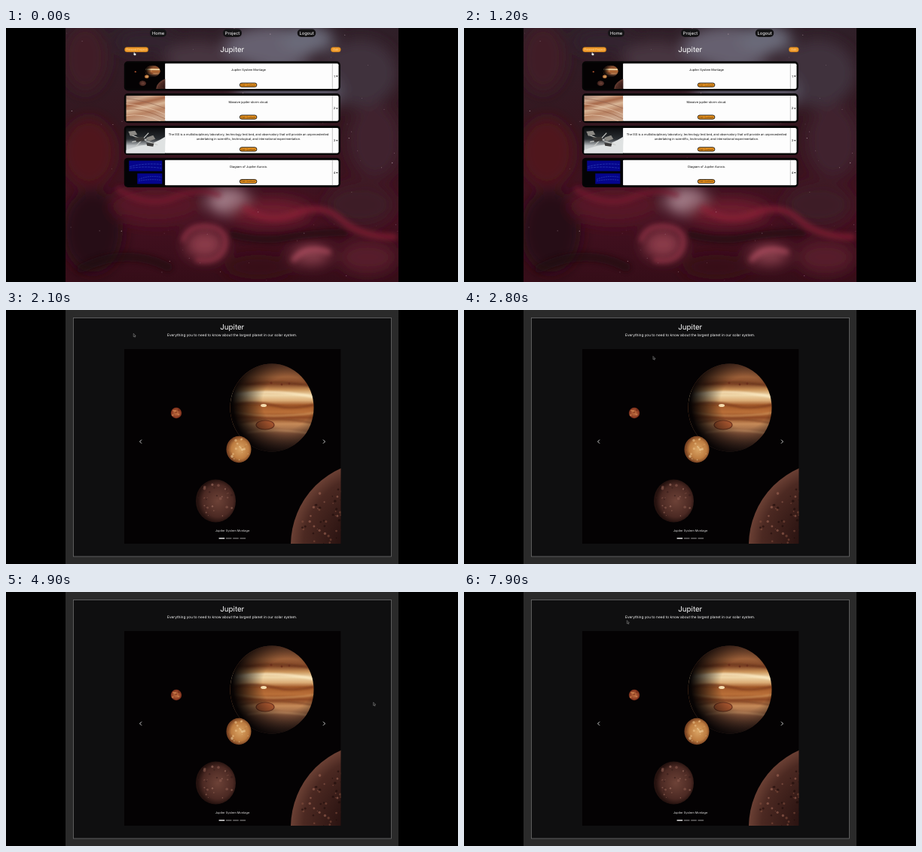
Recreate the animation shown at these times as an HTML page. Size 600 by 338 pixels, loop 8 s.

```html
<!DOCTYPE html>
<html lang="en">
<head>
<meta charset="utf-8">
<title>Jupiter slideshow</title>
<style>
  html, body { margin: 0; width: 100%; height: 100%; overflow: hidden; background: #000; }
  svg { display: block; }
  #stage { width: 100vw; height: 100vh; }
  text { font-family: Inter, Roboto, sans-serif; text-anchor: middle; text-rendering: geometricPrecision; }
</style>
</head>
<body>
<svg id="stage" viewBox="0 0 600 338" xmlns="http://www.w3.org/2000/svg">
  <defs>
    <filter id="soft" x="-30%" y="-30%" width="160%" height="160%"><feGaussianBlur stdDeviation="9"/></filter>
    <filter id="misty" x="-10%" y="-10%" width="120%" height="120%"><feGaussianBlur stdDeviation="3"/></filter>
    <filter id="hazy"><feGaussianBlur stdDeviation="1"/></filter>
    <clipPath id="page"><rect x="79" width="442" height="338"/></clipPath>
    <clipPath id="globe"><ellipse cx="353" cy="130" rx="55.5" ry="58.5"/></clipPath>
    <linearGradient id="sky" x2="0" y2="1">
      <stop offset="0" stop-color="#2f1f28"/>
      <stop offset=".4" stop-color="#35161f"/>
      <stop offset=".75" stop-color="#431020"/>
      <stop offset="1" stop-color="#350d18"/>
    </linearGradient>
    <linearGradient id="bands" x2="0" y2="1">
      <stop offset="0" stop-color="#6b3f2c"/>
      <stop offset=".16" stop-color="#9b5f38"/>
      <stop offset=".24" stop-color="#7e4325"/>
      <stop offset=".3" stop-color="#c99258"/>
      <stop offset=".36" stop-color="#f0d8aa"/>
      <stop offset=".42" stop-color="#dcae78"/>
      <stop offset=".47" stop-color="#a35a2b"/>
      <stop offset=".55" stop-color="#b96f38"/>
      <stop offset=".61" stop-color="#8f4a25"/>
      <stop offset=".68" stop-color="#c58a58"/>
      <stop offset=".8" stop-color="#85543b"/>
      <stop offset="1" stop-color="#3b2620"/>
    </linearGradient>
    <radialGradient id="shade" cx=".68" cy=".44" r=".64">
      <stop offset=".45" stop-color="#000" stop-opacity="0"/>
      <stop offset=".75" stop-color="#030102" stop-opacity=".55"/>
      <stop offset="1" stop-color="#030102" stop-opacity=".98"/>
    </radialGradient>
    <radialGradient id="io"><stop offset="0" stop-color="#c67343"/><stop offset="1" stop-color="#7b2d1a"/></radialGradient>
    <radialGradient id="europa" cx=".55"><stop offset="0" stop-color="#dba565"/><stop offset=".7" stop-color="#bd7c40"/><stop offset="1" stop-color="#7a4322"/></radialGradient>
    <radialGradient id="ganymede" cx=".55"><stop offset="0" stop-color="#6d4237"/><stop offset=".75" stop-color="#4b2923"/><stop offset="1" stop-color="#25120f"/></radialGradient>
    <radialGradient id="callisto"><stop offset=".4" stop-color="#2a1311"/><stop offset=".85" stop-color="#4c2922"/><stop offset="1" stop-color="#6b4034"/></radialGradient>
    <linearGradient id="storm" x2=".35" y2="1">
      <stop offset="0" stop-color="#9d7c70"/><stop offset=".2" stop-color="#cfaa8f"/>
      <stop offset=".38" stop-color="#a8694a"/><stop offset=".55" stop-color="#d9b697"/>
      <stop offset=".75" stop-color="#b98363"/><stop offset="1" stop-color="#c9a389"/>
    </linearGradient>
    <linearGradient id="orbit" x2="0" y2="1">
      <stop offset="0" stop-color="#0b0c0e"/><stop offset=".45" stop-color="#2b2f33"/>
      <stop offset=".7" stop-color="#b9bdbf"/><stop offset="1" stop-color="#e6e8e8"/>
    </linearGradient>

    <symbol id="montage" viewBox="157 52 287.5 259" preserveAspectRatio="none">
      <rect x="157" y="52" width="287.5" height="259" fill="#040203"/>
      <g clip-path="url(#globe)">
        <rect x="297" y="70" width="112" height="120" fill="url(#bands)"/>
        <g fill="none" stroke-width="1.6" opacity=".7" filter="url(#hazy)">
          <path d="M318 99Q360 92 409 102" stroke="#5f2e1b"/>
          <path d="M305 112Q360 105 409 116" stroke="#fff0cb" stroke-width="3"/>
          <path d="M302 126Q330 121 355 127T409 126" stroke="#7c3a1c" stroke-width="3"/>
          <path d="M302 136Q350 145 409 137" stroke="#e3b174"/>
          <path d="M310 150Q360 140 409 151" stroke="#6c331c"/>
          <path d="M320 163Q360 157 400 164" stroke="#e0ad79"/>
        </g>
        <ellipse cx="344" cy="153" rx="12" ry="6" fill="#a7562f" stroke="#6d331e" stroke-width="1.2"/>
        <ellipse cx="342" cy="127" rx="4" ry="2" fill="#f6dcae"/>
        <g fill="#6a2f1b"><circle cx="352" cy="97" r="1.6"/><circle cx="366" cy="99" r="1.4"/><circle cx="376" cy="98" r="1.4"/></g>
        <rect x="296" y="70" width="114" height="120" fill="url(#shade)"/>
      </g>
      <circle cx="226" cy="137" r="7.2" fill="url(#io)"/>
      <ellipse cx="309" cy="185.5" rx="16.5" ry="17.7" fill="url(#europa)"/>
      <ellipse cx="278.5" cy="254" rx="26.5" ry="28.5" fill="url(#ganymede)"/>
      <circle cx="490" cy="313" r="112" fill="url(#callisto)"/>
      <g id="craters"></g>
    </symbol>

    <symbol id="clouds" viewBox="0 0 52 34">
      <rect width="52" height="34" fill="url(#storm)"/>
      <g fill="none" stroke-width="1" opacity=".6">
        <path d="M0 4Q24 6 52 17" stroke="#8d5f4c"/>
        <path d="M0 11Q26 13 52 25" stroke="#efd3b8"/>
        <path d="M0 18Q22 16 52 31" stroke="#93583e"/>
        <path d="M0 27Q22 23 46 34" stroke="#f0d6bd"/>
      </g>
    </symbol>

    <symbol id="station" viewBox="0 0 52 34">
      <rect width="52" height="34" fill="url(#orbit)"/>
      <path d="M0 30Q14 24 25 23T52 12V34H0Z" fill="#dfe2e2"/>
      <path d="M5 9L42 23M13 25L30 7M8 19L34 14" stroke="#c9cac6" stroke-width="1.2"/>
      <path d="M3 5L12 4L15 9L6 11ZM27 13L36 10L39 15L30 18Z" fill="#8b8984"/>
      <path d="M11 13L23 12L25 17L14 19ZM27 20L37 21L36 25L28 24Z" fill="#3a3938"/>
    </symbol>

    <symbol id="aurora" viewBox="0 0 52 34">
      <rect width="52" height="34" fill="#030306"/>
      <path d="M4 1H48V15H4ZM15 18H48V32H15Z" fill="#05058c"/>
      <g fill="none" stroke="#3f5cc8" stroke-width=".5">
        <path d="M5 9Q24 4 47 6M5 11Q25 8 47 11" stroke-dasharray="3 1"/>
        <path d="M17 26Q30 20 47 23M17 28Q32 25 47 27" stroke-dasharray="2 1"/>
      </g>
    </symbol>
  </defs>

  <rect width="600" height="338"/>

  <g id="editor" clip-path="url(#page)">
    <rect x="79" width="442" height="338" fill="url(#sky)"/>
    <g id="glow" filter="url(#soft)"></g>
    <g fill="none" stroke-linecap="round" filter="url(#misty)" opacity=".6">
      <path d="M235 282Q242 262 268 264T291 290Q284 314 254 309" stroke="#a53b50" stroke-width="6"/>
      <path d="M318 240Q350 262 385 247T445 255T515 278" stroke="#8f2338" stroke-width="9"/>
      <path d="M382 308Q398 288 428 298" stroke="#bb5366" stroke-width="7"/>
      <path d="M150 215Q190 240 222 226T282 222" stroke="#7d1d31" stroke-width="8"/>
      <path d="M300 275Q340 285 372 279T450 272" stroke="#1c0911" stroke-width="10"/>
      <path d="M100 320Q160 290 215 318" stroke="#1c0911" stroke-width="12"/>
    </g>
    <g id="stars" fill="#d6bcc6"></g>
    <g id="nav" fill="#fff" font-size="5.8"></g>
    <text x="300.3" y="31.5" font-size="9.7" fill="#fff">Jupiter</text>
    <rect id="focus" x="156.5" y="24.7" width="33.300" height="8.200" rx="2" fill="#1a1518" stroke="#b9c3dd" stroke-width=".7"/>
    <g fill="#ef9a2c" stroke="#a9670f" stroke-width=".4">
      <rect x="157.500" y="25.600" width="31.300" height="6.400" rx="3"/>
      <rect x="431.300" y="25.600" width="13" height="6.400" rx="3"/>
    </g>
    <g font-size="3.8" fill="#ffd592">
      <text x="173.2" y="30.200">Present Project</text>
      <text x="437.8" y="30.200">Edit</text>
    </g>
    <g id="cards"></g>
    <path d="M169.600 32.300q.7-.7 1 .2l.2 1.100 1.500.4q.5.200.3 1l-.4 1.500h-2l-1.400-1.800q0-.7.900-.3Z" fill="#fff" stroke="#222" stroke-width=".35"/>
  </g>

  <g id="show">
    <rect x="79" width="442" height="338" fill="#2a2a2a"/>
    <rect x="89.5" y="10.5" width="422" height="317.5" fill="#0f0f10" stroke="#6d6d6d" stroke-width=".8"/>
    <g fill="#fff">
      <text x="300.3" y="26.200" font-size="9.7">Jupiter</text>
      <text x="300.2" y="35.400" font-size="4.8">Everything you to need to know about the largest planet in our solar system.</text>
    </g>
    <use href="#montage" x="157" y="52" width="287.5" height="259"/>
    <path d="M180 172.600l-2.500 2.500 2.500 2.500M421 172.600l2.500 2.500-2.500 2.500" fill="none" stroke="#c9c9c9" stroke-width="1"/>
    <text x="300.5" y="295" font-size="3.95" fill="#e4e4e4">Jupiter System Montage</text>
    <g id="dots" fill="#fff"></g>
    <path id="arrow" d="M0 0V4.300L1 3.400L1.700 4.900L2.400 4.600L1.800 3.100H3.100Z" fill="#111" stroke="#bbb" stroke-width=".4"/>
  </g>
</svg>

<script>
const LOOP = 8000, PRESS = 2000, OPEN = 2100, STEP = 100;
const $ = id => document.getElementById(id);

let seed = 11;
const rand = (a, b) => {
  seed = (seed * 16807) % 2147483647;
  return a + (b - a) * seed / 2147483647;
};
const pick = list => list[Math.floor(rand(0, list.length))];
const repeat = (n, make) => Array.from({ length: n }, (_, i) => make(i)).join('');

// Background clouds: x, y, rx, ry, colour
const clouds = [
  [105, 40, 30, 45, '#3f1a26'], [185, 18, 40, 18, '#33232e'],
  [255, 40, 45, 22, '#463540'], [350, 25, 60, 28, '#66616f'],
  [400, 15, 35, 18, '#6b6b79'], [470, 60, 50, 45, '#41323d'],
  [375, 85, 70, 35, '#595362'], [490, 150, 35, 50, '#40242e'],
  [110, 165, 35, 45, '#50151f'], [115, 270, 40, 55, '#270e17'],
  [200, 235, 60, 25, '#571626'], [295, 230, 28, 18, '#a07a86'],
  [350, 245, 55, 18, '#6e1d2f'], [264, 288, 26, 20, '#8a3a49'],
  [405, 302, 26, 13, '#8a3f4d'], [470, 235, 45, 28, '#3d1c27'],
  [335, 318, 45, 16, '#380c17'], [480, 305, 38, 22, '#571a29']
];
$('glow').innerHTML = clouds.map(([x, y, rx, ry, c]) =>
  `<ellipse cx="${x}" cy="${y}" rx="${rx}" ry="${ry}" fill="${c}"/>`).join('');

$('stars').innerHTML = repeat(70, () =>
  `<circle cx="${rand(80, 520).toFixed(1)}" cy="${rand(0, 338).toFixed(1)}"
    r="${rand(.3, .7).toFixed(2)}" opacity="${rand(.3, .7).toFixed(2)}"/>`);

// Surface marks spread evenly over each moon
const marks = (n, cx, cy, r, colours, from = 0, to = 2 * Math.PI) => repeat(n, () => {
  const a = rand(from, to), d = r * Math.sqrt(rand(0, .85));
  return `<circle cx="${(cx + d * Math.cos(a)).toFixed(1)}" cy="${(cy + d * Math.sin(a)).toFixed(1)}"
    r="${rand(.5, 1.9).toFixed(1)}" fill="${pick(colours)}" opacity=".55"/>`;
});
$('craters').innerHTML =
  marks(9, 226, 137, 6, ['#67210f', '#dc9058']) +
  marks(22, 309, 185.5, 16, ['#efc58b', '#9f602f', '#f3d4a0']) +
  marks(32, 278.5, 254, 26, ['#8f5e50', '#331b18', '#a97868']) +
  marks(85, 490, 313, 111, ['#a86c59', '#1b0a09', '#86503f'], Math.PI, 4.4);

$('nav').innerHTML = [['Home', 202, 22], ['Project', 300.5, 25], ['Logout', 399, 24.5]]
  .map(([label, x, w]) =>
    `<rect x="${x - w / 2}" y="1.5" width="${w}" height="10.500" rx="5" fill="#151416"/>
     <text x="${x}" y="8.700">${label}</text>`).join('');

const items = [
  ['montage', 'Jupiter System Montage'],
  ['clouds', 'Massive jupiter storm cloud.'],
  ['station', 'The ISS is a multidisciplinary laboratory, technology test bed, and observatory that will provide an unprecedented',
    'undertaking in scientific, technological, and international experimentation.'],
  ['aurora', 'Diagram of Jupiter Aurora.']
];
$('cards').innerHTML = items.map(([art, ...lines], i) => `
  <g transform="translate(0 ${44.3 + i * 42.8})">
    <rect x="156.800" width="287" height="39.200" rx="5" fill="#050505"/>
    <rect x="210" y="3" width="231.500" height="33.600" rx="2" fill="#fdfdfd"/>
    <use href="#${art}" x="159.300" y="2.800" width="52" height="34"/>
    <path d="M433.300 3V36.600" stroke="#888" stroke-width=".5"/>
    ${lines.map((s, n) => `<text x="322" y="${13 + n * 6.1}" font-size="3.97">${s}</text>`).join('')}
    <rect x="310.300" y="28.900" width="22.600" height="5.200" rx="2.600" fill="#f3981f" stroke="#111" stroke-width=".9"/>
    <text x="321.600" y="32.700" font-size="3.25" fill="#2a1800">Edit Content</text>
    <text x="436" y="21.400" font-size="4">${i + 1}</text>
    <path d="M438 19.300h2.600l-1.300 1.600Z"/>
  </g>`).join('');

$('dots').innerHTML = repeat(4, i =>
  `<rect x="${282.6 + i * 9.3}" y="303.200" width="7.600" height="1.300" opacity="${i ? .45 : 1}"/>`);

// Pointer moves: start time, end time, x, y
const moves = [
  [2500, 3400, 484.5, 147.8],
  [4800, 5200, 504.5, 141.5],
  [5500, 6200, 285.5, 20.5],
  [6600, 6900, 318, 24],
  [7200, 7700, 203.8, 37.3],
  [7800, 7900, 216.3, 37.8]
];
const ease = p => p * p * (3 - 2 * p);

function pointerAt(t) {
  let x = 169.2, y = 31.3;
  for (const [start, end, toX, toY] of moves) {
    const p = ease(Math.min(1, Math.max(0, (t - start) / (end - start))));
    x += (toX - x) * p;
    y += (toY - y) * p;
  }
  return [x, y];
}

function draw(t) {
  const open = t >= OPEN;
  $('editor').style.display = open ? 'none' : '';
  $('show').style.display = open ? '' : 'none';
  $('focus').style.display = t >= PRESS ? '' : 'none';
  const [x, y] = pointerAt(Math.floor(t / STEP) * STEP);
  $('arrow').setAttribute('transform', `translate(${x.toFixed(2)} ${y.toFixed(2)})`);
}

const begin = performance.now();
function tick() {
  draw((performance.now() - begin) % LOOP);
  requestAnimationFrame(tick);
}
tick();
</script>
</body>
</html>
```
